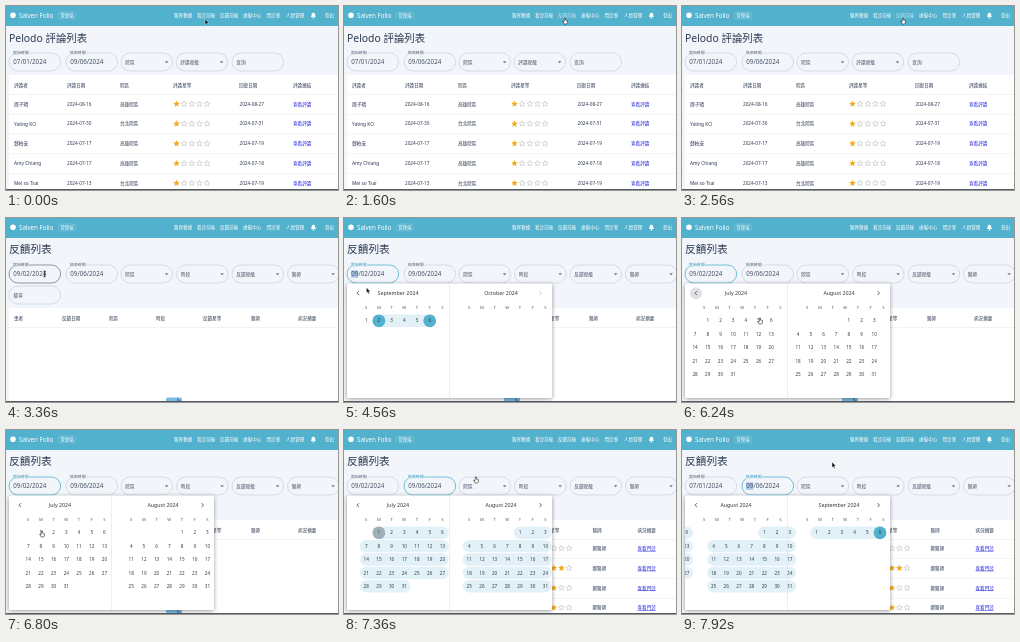
Animation of 332x184 px, one loop 8000 ms. Source, as an HTML page with a canvas:

```html
<!DOCTYPE html>
<html lang="zh-Hant">
<head>
<meta charset="utf-8">
<title>評論與反饋列表</title>
<style>
html, body { margin: 0; width: 100%; height: 100%; overflow: hidden; background: #fff; }
canvas { display: block; width: 332px; height: 184px; }
</style>
</head>
<body>
<canvas id="stage"></canvas>
<script>
const canvas = document.getElementById('stage');
const ctx = canvas.getContext('2d');
const W = 332, H = 184, LOOP = 8000;
const dpr = window.devicePixelRatio || 1;
canvas.width = W * dpr;
canvas.height = H * dpr;

const TEAL = '#52b1cd', PAGE = '#f2f5fa', INK = '#2c3850', LINE = '#b9c1cc';
const LINK = '#2020e0', GOLD = '#f4a81c', RANGE = '#e1f1f7';
const FONT = '"Noto Sans", "Noto Sans CJK TC", "Noto Sans CJK", sans-serif';

// Moments of the story, in ms
const PAGE_SWAP = 2880, OPEN = 3760, PREV_1 = 5200, PREV_2 = 6039;
const PICK = 6960, LOADED = 7200, NEXT = 7720, SLIDE = 375;

// Calendar geometry
const COLUMN = 12.7, ROW = 13.35, PANEL = 103, FIRST_X = 22.2, FIRST_Y = 102.8;

// Pointer stops: time, x, y
const PATH = [
  [0, 199, 14], [940, 199, 14], [1280, 221, 13], [2880, 221, 13], [3300, 38.5, 56],
  [3900, 38.5, 56], [4560, 22.5, 70.5], [4760, 14, 74], [6060, 14, 74], [6230, 78, 101],
  [6400, 78, 101], [6720, 36, 102], [7020, 36, 102], [7340, 132, 48], [7440, 132, 48], [7800, 150, 33]
];

function text(str, x, y, size, color = INK, align = 'left', weight = 400) {
  ctx.font = `${weight} ${size}px ${FONT}`;
  ctx.textAlign = align;
  ctx.textBaseline = 'alphabetic';
  ctx.fillStyle = color;
  ctx.fillText(str, x, y + size * 0.36);
}

function rect(x, y, w, h, color) {
  ctx.fillStyle = color;
  ctx.fillRect(x, y, w, h);
}

function paint(fill, stroke, width) {
  if (fill) { ctx.fillStyle = fill; ctx.fill(); }
  if (stroke) { ctx.strokeStyle = stroke; ctx.lineWidth = width; ctx.stroke(); }
}

function pill(x, y, w, h, r, fill, stroke, width = 0.6) {
  ctx.beginPath();
  ctx.roundRect(x, y, w, h, r);
  paint(fill, stroke, width);
}

function disc(x, y, r, color) {
  pill(x - r, y - r, 2 * r, 2 * r, r, color);
}

function shape(points, fill, stroke, width = 0.6) {
  ctx.beginPath();
  points.forEach(([x, y]) => ctx.lineTo(x, y));
  ctx.closePath();
  paint(fill, stroke, width);
}

function stars(x, y, filled) {
  for (let i = 0; i < 5; i++) {
    const size = i < filled ? 3.5 : 3;
    const points = Array.from({ length: 10 }, (_, k) => {
      const r = k % 2 ? size * 0.45 : size, a = k * Math.PI / 5 - Math.PI / 2;
      return [x + i * 7.65 + r * Math.cos(a), y + r * Math.sin(a)];
    });
    if (i < filled) shape(points, GOLD);
    else shape(points, null, '#b4b4b4', 0.5);
  }
}

// cubic-bezier(.35, .8, .4, 1)
function slideEase(p) {
  if (p <= 0) return 0;
  if (p >= 1) return 1;
  const curve = (s, a, b) => 3 * s * (1 - s) ** 2 * a + 3 * s * s * (1 - s) * b + s ** 3;
  let lo = 0, hi = 1;
  for (let i = 0; i < 20; i++) {
    const mid = (lo + hi) / 2;
    if (curve(mid, 0.35, 0.4) < p) lo = mid; else hi = mid;
  }
  return curve(lo, 0.8, 1);
}

function pointerAt(t) {
  const i = PATH.findIndex(stop => stop[0] > t);
  if (i < 0) return PATH[PATH.length - 1].slice(1);
  const [t0, x0, y0] = PATH[i - 1], [t1, x1, y1] = PATH[i];
  const p = (t - t0) / (t1 - t0), e = p * p * (3 - 2 * p);
  return [x0 + (x1 - x0) * e, y0 + (y1 - y0) * e];
}

function drawHeader(t) {
  rect(0, 0, W, 20, TEAL);
  disc(7, 9.3, 2.8, '#fff');
  text('Salven Folio', 13, 9.3, 6.2, '#fff');
  pill(52.5, 6, 17, 6.8, 2, null, '#8fcbde', 0.5);
  text('管理端', 61, 9.3, 4.3, '#fff', 'center');
  const [px, py] = pointerAt(t);
  const items = ['醫界數據', '看診前後', '反饋前後', '虛擬中心', '問診室', '人員管理'];
  [168, 191, 214, 237, 260.5, 280].forEach((x, i) => {
    const hovered = i === 2 && py < 19 && px > x && px < x + 19;
    text(items[i], x, 9.3, 4.6, hovered ? '#c4e4ee' : '#fff', 'left', 500);
  });
  shape([[304.8, 11], [305.5, 9.8], [305.7, 7.8], [307.4, 6.4], [309.1, 7.8], [309.3, 9.8], [310, 11]], '#fff');
  disc(307.4, 11.9, 0.8, '#fff');
  text('登出', 319, 9.3, 4.6, '#fff', 'left', 500);
}

function field(x, value, { label, arrow, focus, hover, marked, y = 47 } = {}) {
  pill(x, y, 51.6, 18, 9, null, focus ? TEAL : hover ? INK : LINE, focus ? 0.8 : 0.5);
  if (label) {
    rect(x + 3.2, y - 1.5, 17, 3, PAGE);
    text(label, x + 4, y, 3.9, focus ? '#2f9dbd' : '#56627a');
  }
  if (marked) rect(x + 4, y + 5.4, 7.2, 7.4, '#a9c8ec');
  text(value, x + 4.3, y + 9, label ? 6.2 : 4.7, '#465064');
  if (arrow) shape([[x + 43.8, y + 8.3], [x + 47.4, y + 8.3], [x + 45.6, y + 10.2]], '#6d7685');
}

function tableTop(y, columns) {
  rect(3, y, W, H - y, '#fff');
  columns.forEach(([x, name]) => text(name, x, y + 10, 4.6, INK, 'left', 500));
  rect(3, y + 19.3, W, 0.5, '#e3e6ea');
}

function drawReviews() {
  text('Pelodo 評論列表', 3, 32, 10.4);
  field(3, '07/01/2024', { label: '起始時間' });
  field(60, '09/06/2024', { label: '結束時間' });
  field(115, '院區', { arrow: true });
  field(170, '評論星級', { arrow: true });
  field(226, '查詢');
  tableTop(69, [[8, '評論者'], [61, '評論日期'], [114, '院區'], [167, '評論星等'], [233, '回復日期'], [287, '評論連結']]);
  const rows = [
    ['周子晴', '08-16', '高雄院區', '08-27'],
    ['Yating KO', '07-30', '台北院區', '07-31'],
    ['鄭柏安', '07-17', '高雄院區', '07-19'],
    ['Amy Chiang', '07-17', '高雄院區', '07-18'],
    ['Mei so Tsai', '07-13', '台北院區', '07-19']
  ];
  rows.forEach(([name, date, branch, reply], i) => {
    const y = 98 + i * 19.8;
    text(name, 8, y, 4.8);
    text('2024-' + date, 61, y, 4.7);
    text(branch, 114, y, 4.6);
    stars(170.5, y, 1);
    text('2024-' + reply, 233.5, y, 4.7);
    text('查看評論', 287, y, 4.6, LINK, 'left', 500);
    rect(3, y + 10, W, 0.5, '#e6e9ec');
  });
}

function drawFeedback(t) {
  const loaded = t >= LOADED, picked = t >= PICK;
  text('反饋列表', 3, 31.5, 10.7);
  field(3, t < NEXT ? '09/02/2024' : '07/01/2024', {
    label: '起始時間', focus: t >= OPEN && !picked, hover: t > 3240 && t < OPEN, marked: t >= OPEN && t < PREV_1
  });
  field(60, '09/06/2024', { label: '結束時間', focus: picked, marked: t >= NEXT });
  field(115, '院區', { arrow: true });
  field(170.5, '時段', { arrow: true });
  field(226, '反饋星級', { arrow: true });
  field(281.5, '醫師', { arrow: true });
  field(3, '搜尋', { y: 68 });
  tableTop(90, [[8, '患者'], [56, '反饋日期'], [103, '院區'], [150, '時段'], [197, '反饋星等'],
    [loaded ? 248.5 : 245, '醫師'], [loaded ? 293.5 : 292, '病況摘要']]);
  if (!loaded) {
    pill(160, 179.5, 16, 8, 1.5, '#7dbde6');
    shape([[171, 179.5], [176, 184], [171, 184]], '#3f8fce');
    return;
  }
  [2, 4, 3, 3].forEach((filled, i) => {
    const y = 118.3 + i * 19.8;
    stars(194.5, y, filled);
    text('鄭醫師', 248.5, y, 4.6);
    text('查看門診', 293.5, y, 4.6, LINK);
    rect(293.5, y + 2.6, 18.4, 0.5, LINK);
    rect(3, y + 10, W, 0.5, '#e6e9ec');
  });
}

const MONTHS = { 6: 'July', 7: 'August', 8: 'September', 9: 'October' };
const LAST_DAY = new Date(2024, 8, 6);

function drawMonth(month, offset, start, picked) {
  const count = new Date(2024, month + 1, 0).getDate();
  const first = new Date(2024, month, 1).getDay();
  const spot = day => {
    const n = first + day - 1;
    return [FIRST_X + offset + (n % 7) * COLUMN, FIRST_Y + Math.floor(n / 7) * ROW];
  };
  const days = [];
  for (let day = 1; day <= count; day++) {
    const date = new Date(2024, month, day);
    if (date <= LAST_DAY) days.push({ day, date, at: spot(day) });
  }
  const bands = new Map();
  days.filter(d => d.date >= start).forEach(({ at: [x, y] }) => {
    const band = bands.get(y) || { from: x };
    band.to = x;
    bands.set(y, band);
  });
  bands.forEach(({ from, to }, y) => pill(from - 6.3, y - 6.2, to - from + 12.6, 12.4, 6.2, RANGE));
  days.forEach(({ day, date, at: [x, y] }) => {
    if (+date === +start) disc(x, y, 6.4, picked ? '#9fb0b9' : TEAL);
    if (+date === +LAST_DAY) disc(x, y, 6.4, TEAL);
    text(day, x, y, 4.6, '#333a44', 'center');
  });
}

function chevron(x, dir, color) {
  ctx.beginPath();
  ctx.moveTo(x - dir, 73.2);
  ctx.lineTo(x + dir, 75.2);
  ctx.lineTo(x - dir, 77.2);
  ctx.strokeStyle = color;
  ctx.lineWidth = 0.9;
  ctx.stroke();
}

function drawPicker(t) {
  const moved = since => slideEase((t - since) / SLIDE);
  const position = 8 - moved(PREV_1) - moved(PREV_2) + moved(NEXT);
  const shown = 8 - (t >= PREV_1) - (t >= PREV_2) + (t >= NEXT);
  const picked = t >= PICK;
  const start = picked ? new Date(2024, 6, 1) : new Date(2024, 8, 2);

  ctx.save();
  ctx.shadowColor = 'rgba(0,0,0,.4)';
  ctx.shadowBlur = 4 * dpr;
  ctx.shadowOffsetY = dpr;
  pill(3, 65.5, 205, 114.5, 1.5, '#fff');
  ctx.restore();

  if (t > 4700 && t < 6420) disc(14, 75.2, 6, '#dfe1e4');
  chevron(14, -1, '#4a4f58');
  chevron(196.5, 1, shown === 8 ? '#c4c7cc' : '#4a4f58');
  [0, 1].forEach(side => {
    text(`${MONTHS[shown + side]} 2024`, 54 + side * PANEL, 75.2, 5.3, '#30363f', 'center');
    [...'SMTWTFS'].forEach((letter, i) =>
      text(letter, FIRST_X + side * PANEL + i * COLUMN, 89.6, 4.2, '#50565f', 'center'));
  });

  ctx.save();
  ctx.beginPath();
  ctx.rect(3, 95, 205, 84);
  ctx.clip();
  for (let month = 6; month <= 9; month++) {
    const offset = (month - position) * PANEL;
    if (Math.abs(offset) < 2 * PANEL) drawMonth(month, offset, start, picked);
  }
  ctx.restore();
  rect(105.3, 65.5, 0.5, 114.5, '#d9dce0');
}

const ARROW = [[0, -1], [0, 4.6], [1.2, 3.6], [2.2, 5.6], [3, 5.2], [2.2, 3.2], [3.8, 3.1]];
const HAND = [[-0.7, -1], [0.5, -1], [0.6, 1.1], [2.5, 1.6], [2.3, 4], [1.5, 5], [-0.8, 5], [-2.3, 2.3], [-0.7, 2.4]];

function drawPointer(t) {
  const [x, y] = pointerAt(t);
  const overLink = (t > 1100 && t < 2950) || (t > 4700 && t < 7480);
  ctx.save();
  ctx.translate(x, y);
  if (t > 3240 && t < 3950) {
    rect(-0.4, -3, 0.8, 6, '#222');
    rect(-1.3, -3.2, 2.6, 0.6, '#222');
    rect(-1.3, 2.6, 2.6, 0.6, '#222');
  } else if (overLink) {
    shape(HAND, '#fff', '#222', 0.6);
  } else {
    shape(ARROW, '#111', '#fff', 0.4);
  }
  ctx.restore();
}

function draw(t) {
  ctx.setTransform(dpr, 0, 0, dpr, 0, 0);
  rect(0, 0, W, H, PAGE);
  drawHeader(t);
  if (t < PAGE_SWAP) drawReviews();
  else drawFeedback(t);
  if (t >= OPEN) drawPicker(t);
  rect(0, 183, W, 1, '#555b62');
  drawPointer(t);
}

const began = performance.now();
function tick() {
  draw((performance.now() - began) % LOOP);
  requestAnimationFrame(tick);
}
tick();
</script>
</body>
</html>
```
